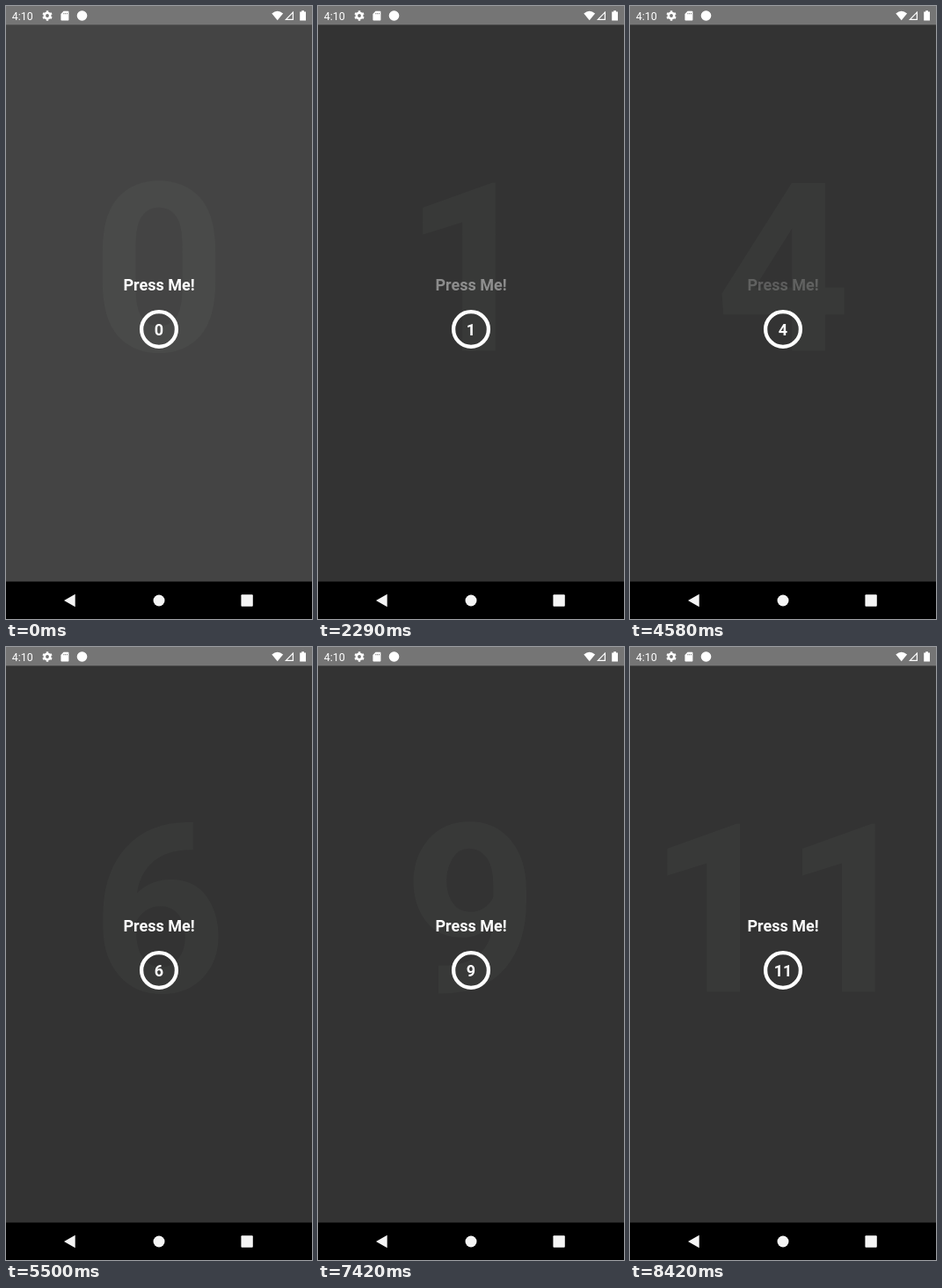
Write an HTML page that moves like this. It is 348 by 696 pixels and loops after 9290 ms.

```html
<!DOCTYPE html>
<html lang="en">
<head>
<meta charset="utf-8">
<title>Press counter</title>
<style>
  html, body { margin: 0; width: 100%; height: 100%; overflow: hidden; background: #000; }
  svg { display: block; width: 100vw; height: 100vh; }
  text { font-family: Roboto, sans-serif; fill: #fff; }
  .bold { font-weight: 700; font-size: 18px; text-anchor: middle; }
  #big { font-size: 268px; fill: #c8f0e0; fill-opacity: .03; }
</style>
</head>
<body>
<svg viewBox="0 0 348 696">
  <rect id="page" y="21" width="348" height="632.5"/>
  <rect width="348" height="21.3" fill="#757575"/>

  <text x="6.8" y="15.8" font-size="12.4">4:10</text>
  <g fill="none" stroke="#fff">
    <circle cx="47" cy="11" r="3.2" stroke-width="2.6"/>
    <circle cx="47" cy="11" r="4.9" stroke-width="1.7" pathLength="12" stroke-dasharray="1" stroke-dashoffset="-.5"/>
    <path d="M318.4 15.4H326.4V7.2Z" stroke-width="1.2"/>
  </g>
  <g fill="#fff">
    <path d="M65.5 5.8H70.5Q71.4 5.8 71.4 6.7V15.5Q71.4 16.4 70.5 16.4H63.3Q62.4 16.4 62.4 15.5V9Z"/>
    <path d="M65.4 8.6H70" stroke="#757575" stroke-width="1.4" stroke-dasharray=".9 .9"/>
    <circle cx="86.5" cy="11" r="5.8"/>
    <path d="M302.3 8.4Q308.7 3 315.1 8.4L308.7 16.2Z"/>
    <path d="M334.2 6.4H336.2V5.2H339V6.4H341V16.5H334.2Z"/>
  </g>

  <text id="big" class="bold" x="174" y="391.5"></text>
  <text id="label" class="bold" x="174" y="322.8">Press Me!</text>
  <circle cx="174" cy="367" r="19.9" fill="none" stroke="#fff" stroke-width="4.3"/>
  <text id="small" class="bold" x="174" y="374"></text>

  <g fill="#f5f5f5">
    <path d="M66 675L78.7 667.8V682.2Z"/>
    <circle cx="174" cy="675" r="6.5"/>
    <rect x="267.4" y="668.3" width="13.4" height="13.4" rx="1"/>
  </g>
</svg>
<script>
const LOOP = 9290;
const DIM = 0.2, HOLD = 150, FADE_IN = 30, FADE_OUT = 250;

// Moments at which the finger lifts: the counter goes up, the label recovers.
const releases = [2195, 2710, 3540, 4140, 4680, 5210, 5740, 6310, 6970, 7600, 8195];

const [page, big, label, small] =
  ["page", "big", "label", "small"].map(id => document.getElementById(id));

// Quadratic ease in and out, clamped to 0..1.
function ease(x) {
  x = Math.min(1, Math.max(0, x));
  return x < 0.5 ? 2 * x * x : 1 - 2 * (1 - x) ** 2;
}

function labelOpacity(t) {
  const up = releases.findLast(r => r - HOLD <= t) ?? -LOOP;
  const down = up - HOLD;
  const dimmed = ease((t - down) / FADE_IN) - ease((t - up) / FADE_OUT);
  return 1 - (1 - DIM) * dimmed;
}

function draw(t) {
  const count = releases.filter(r => r <= t).length;
  page.setAttribute("fill", count % 10 ? "#333" : "#444");
  big.textContent = small.textContent = count;
  label.setAttribute("opacity", labelOpacity(t));
}

const start = performance.now();
function frame() {
  draw((performance.now() - start) % LOOP);
  requestAnimationFrame(frame);
}
frame();
</script>
</body>
</html>
```
